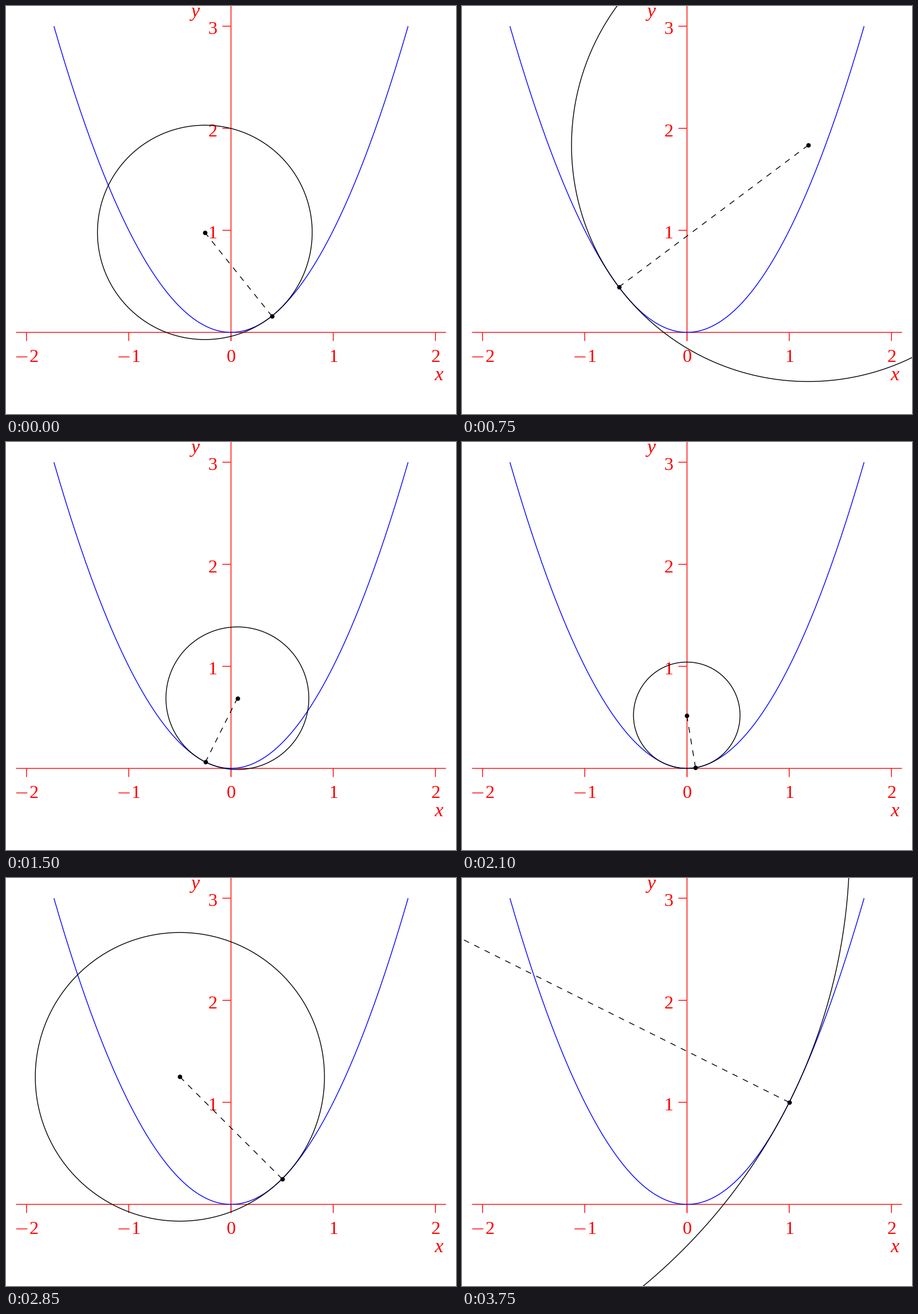
A matplotlib script that plays this animation: 785 px wide and 713 px high, repeating every 3900 ms.

```python
import numpy as np
import matplotlib.pyplot as plt
from matplotlib.animation import FuncAnimation

W, H, DPI = 785, 713, 64
PT = 72 / DPI                      # points per pixel
OX, OY, UNIT = 392.5, 570.4, 178.35
LINE = 1.4 * PT
DASH = 20.3                        # preferred dash period in pixels
FRAMES, STEP_MS = 26, 150

fig = plt.figure(figsize=(W / DPI, H / DPI), dpi=DPI, facecolor="white")
ax = fig.add_axes([0, 0, 1, 1])
ax.set_xlim(0, W)
ax.set_ylim(H, 0)
ax.axis("off")


def px(x, y):
    return OX + UNIT * x, OY - UNIT * y


def stroke(xs, ys, color, z=1):
    return ax.plot(xs, ys, color=color, lw=LINE, zorder=z, snap=False,
                   solid_capstyle="butt")[0]


def label(x, baseline, text, size=32, style="normal"):
    ax.text(x, baseline, text, color="red", fontsize=size * PT, style=style,
            family="Liberation Serif", ha="center", va="baseline", zorder=1)


def draw_axes():
    stroke([17.5, 767.5], [OY, OY], "red")
    stroke([OX, OX], [-5, OY + 15], "red")
    for n in range(-2, 3):
        x, _ = px(n, 0)
        stroke([x, x], [OY, OY + 15], "red")
        if n < 0:
            stroke([x - 18, x + 1.5], [613.3, 613.3], "red")
        label(x + (12.5 if n < 0 else 0), 622, str(abs(n)))
    for n in range(1, 4):
        _, y = px(0, n)
        stroke([OX - 15, OX], [y, y], "red")
        label(360.5, y + 14, str(n))
    label(754.5, 653.5, "x", 34, "italic")
    label(330.5, 19, "y", 34, "italic")


draw_axes()
u = np.linspace(-np.sqrt(3), np.sqrt(3), 201)
stroke(*px(u, u ** 2), "blue", 2)

turn = np.linspace(0, 2 * np.pi, 401)
circle = stroke([], [], "black", 3)
radius = stroke([], [], "black", 3)
dots, = ax.plot([], [], "o", color="black", ms=7.8 * PT, mew=0, zorder=4)


def contact(i):
    """Touching point's x: a short first pose, then an even sweep from -1 to 1."""
    return 0.4 if i == 0 else -1 + (i - 1) / 12


def update(i):
    t = contact(i)
    r = (1 + 4 * t * t) ** 1.5 / 2
    cx, cy = -4 * t ** 3, 3 * t * t + 0.5
    circle.set_data(*px(cx + r * np.cos(turn), cy + r * np.sin(turn)))

    ends = px(np.array([t, cx]), np.array([t * t, cy]))
    radius.set_data(*ends)
    dots.set_data(*ends)

    # Fit the dashes so that both ends of the radius are drawn.
    length = r * UNIT
    half = length / (2 * round(length / DASH - 0.5) + 1)
    radius.set_linestyle((0, (half * PT / LINE, half * PT / LINE)))
    return circle, radius, dots


anim = FuncAnimation(fig, update, frames=FRAMES, interval=STEP_MS,
                     repeat=True, repeat_delay=0, blit=False)
plt.show()
```
